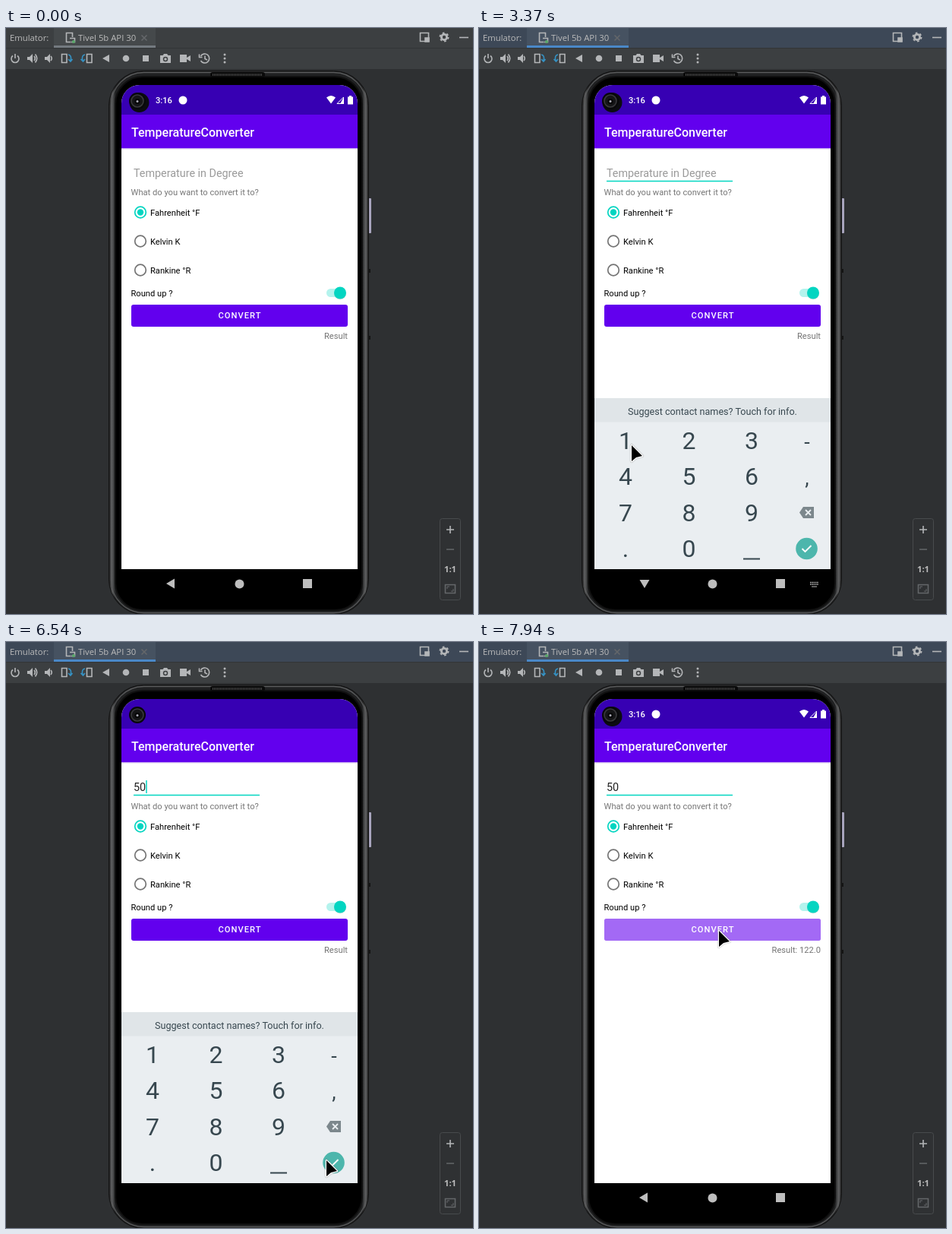
An HTML page that plays this animation: 615 by 771 pixels, repeating every 8000 ms.

```html
<!DOCTYPE html>
<html lang="en">
<head>
<meta charset="utf-8">
<title>Temperature converter in an emulator</title>
<style>
  html, body { margin: 0; width: 100%; height: 100%; overflow: hidden; background: #2e3032; }
  svg { display: block; width: 615px; height: 771px; }
  text { font-family: Roboto, sans-serif; font-size: 11.15px; }
  .ide { font-family: "Open Sans", sans-serif; font-size: 11.3px; fill: #bbb; }
  .line { fill: none; stroke: #b4b6b8; stroke-width: 1.6; }
  .dim { stroke: #64676a; }
  .blue { stroke: #3592c4; }
  .gray { fill: #757575; }
  .medium { font-weight: 500; fill: #fff; }
  .mid { text-anchor: middle; }
  .end { text-anchor: end; }
  .key { font-size: 32px; fill: #37474f; text-anchor: middle; }
</style>
</head>
<body>
<svg viewBox="0 0 615 771">
  <defs>
    <clipPath id="screenClip"><rect x="152" y="75" width="311" height="678" rx="24"/></clipPath>
    <clipPath id="buttonClip"><rect x="165" y="364" width="285" height="29" rx="3"/></clipPath>
    <linearGradient id="rim" x2="1" y2="0">
      <stop offset="0" stop-color="#1a1a1a"/><stop offset=".012" stop-color="#5c5d5e"/>
      <stop offset=".025" stop-color="#202122"/><stop offset=".975" stop-color="#202122"/>
      <stop offset=".988" stop-color="#5c5d5e"/><stop offset="1" stop-color="#1a1a1a"/>
    </linearGradient>
  </defs>

  <!-- tool window -->
  <rect width="615" height="771" fill="#2e3032"/>
  <rect width="615" height="54" fill="#3c3f41"/>
  <rect id="header" width="615" height="26"/>
  <rect id="tab" x="63" width="134" height="26"/>
  <rect id="tabLine" x="63" y="23" width="134" height="3"/>
  <path d="M0 26.5H615" stroke="#323537"/>
  <text class="ide" x="5" y="17">Emulator:</text>
  <text class="ide" x="95" y="17">Tivel 5b API 30</text>
  <g class="line" stroke-width="1.2">
    <path d="M85 18.500H79.500V6.500H87.500V12"/><path d="M84 13.500H90.500V18.500H85.500"/>
    <path class="dim" d="M178.500 9.500l7 7m0-7l-7 7"/>
    <path d="M545.500 6.500H556.500V17.500H545.500z"/><path d="M552 13H557V18H552z" fill="#b4b6b8"/>
    <path d="M597 12.500H609"/>
    <circle cx="577" cy="12" r="3.600" stroke-width="2.800"/>
    <circle cx="577" cy="12" r="5.500" stroke-width="2" stroke-dasharray="2.600 3.160"/>
  </g>
  <circle cx="89" cy="18" r="2" fill="#59a869"/>

  <!-- toolbar -->
  <g class="line">
    <path d="M9 36.500a5 5 0 1 0 6 0M12 34V40"/>
    <path d="M37 37q2.500 3 0 6M38.500 34.500q4.500 5.500 0 11M59 37q2.500 3 0 6"/>
    <path d="M73.500 34.500H80V45.500H73.500zM106.500 34.500H113V45.500H106.500z"/>
    <path class="blue" d="M82 35q5 1 3 8m-3-2l3 3 2.500-3M104 35q-5 1-3 8m-2.500-2l3 3 2.500-3"/>
    <path d="M256.500 37a6 6 0 1 1 0 6M254.500 34.500v4h4M262 36.500V40.500l3 1.500"/>
  </g>
  <g fill="#b4b6b8">
    <path d="M28 38h3l4-4v12l-4-4h-3zM51 38h3l4-4v12l-4-4h-3z"/>
    <path d="M127 40l9-5v10z"/><circle cx="158" cy="40" r="4.300"/><path d="M180 36h8v8h-8z"/>
    <path d="M203 36h3.500l1.500-2h4l1.500 2h3.500v10h-14z"/>
    <path d="M229 35h9v10h-9zM238 39l5-3v8l-5-3z"/>
    <circle cx="288" cy="35" r="1.500"/><circle cx="288" cy="40" r="1.500"/><circle cx="288" cy="45" r="1.500"/>
  </g>
  <circle cx="210" cy="41" r="2.500" fill="#b4b6b8" stroke="#3c3f41" stroke-width="1.400"/>

  <!-- zoom panel -->
  <rect x="571.500" y="645.500" width="27" height="107" rx="3" fill="#2f3133" stroke="#484b4d"/>
  <g class="line">
    <path d="M580 660H590M585 655V665"/>
    <path class="dim" d="M580 686H590M578.500 732.500H591.500V743.500H578.500z"/>
    <path class="dim" stroke-width="1" d="M581 738V735H584M589 738V741H586"/>
  </g>
  <text class="ide mid" x="585" y="716" font-weight="700">1:1</text>

  <!-- handset -->
  <rect x="477.500" y="224" width="3.500" height="46" rx="1" fill="#a8a4bd"/>
  <path d="M479 317v5M479 405v5" stroke="#151515" stroke-width="2"/>
  <rect x="135.500" y="56.500" width="342" height="715" rx="46" fill="url(#rim)" stroke="#121212"/>
  <rect x="138.500" y="58.500" width="336" height="711" rx="43" fill="none" stroke="#58595a" stroke-width="1.300"/>
  <rect x="144" y="64" width="325" height="702" rx="36" fill="#000" stroke="#101010" stroke-width="2"/>
  <rect x="269" y="58" width="72" height="7" rx="3" fill="#0a0a0a"/>
  <path d="M272 61.500H338" stroke="#4a4a4a" stroke-width="3" stroke-dasharray="1 1"/>

  <!-- app -->
  <g clip-path="url(#screenClip)">
    <rect x="152" y="75" width="311" height="637" fill="#fff"/>
    <rect x="152" y="75" width="311" height="39" fill="#3700b3"/>
    <rect x="152" y="114" width="311" height="44.500" fill="#6200ee"/>
    <path d="M152 159H463" stroke="#d9cdec"/>
    <g id="status">
      <circle cx="175.500" cy="98" r="13" fill="#0c0c10"/>
      <text class="medium" x="197" y="99">3:16</text>
      <g fill="#fff">
        <circle cx="233" cy="95" r="5.500"/>
        <path d="M422 91.500q6-5 12 0l-6 8zM450 90.500h2v-1.500h3v1.500h2v10h-7z"/>
        <path d="M440 100h5v-9.500z"/>
      </g>
      <path d="M436 99.500L444.500 91V99.500z" fill="none" stroke="#fff"/>
    </g>
    <circle cx="173" cy="96" r="11" fill="#08080a"/>
    <circle cx="173" cy="96" r="8" fill="#151517" stroke="#39393c" stroke-width="1.600"/>
    <circle cx="173" cy="96.500" r="3.500" fill="#050506"/>
    <circle cx="173" cy="96.500" r="1.500" fill="#a9a9b5"/>

    <text class="medium" x="165" y="143" style="font-size:16px">TemperatureConverter</text>
    <text id="field" x="168" y="195.500" style="font-size:14.350px"></text>
    <path id="hoverLine" d="M243 201.500H334" stroke="#ddd"/>
    <path id="focusLine" d="M168 201.500H334" stroke="#03d5c1" stroke-width="1.600"/>
    <rect id="caret" y="182" width="1.500" height="17" fill="#03d5c1"/>
    <text class="gray" x="164.500" y="220">What do you want to convert it to?</text>
    <g fill="none" stroke="#757575" stroke-width="1.700">
      <circle cx="177" cy="242.500" r="7.300" stroke="#03d5c1"/>
      <circle cx="177" cy="280.500" r="7.300"/>
      <circle cx="177" cy="318.500" r="7.300"/>
    </g>
    <circle cx="177" cy="242.500" r="4.200" fill="#03d5c1"/>
    <text x="190" y="246.500">Fahrenheit °F</text>
    <text x="190" y="284.500">Kelvin K</text>
    <text x="190" y="322.500">Rankine °R</text>
    <text x="164.500" y="353">Round up ?</text>
    <rect x="422" y="343" width="25" height="11" rx="5.500" fill="#b4f3ed"/>
    <circle cx="440" cy="349.300" r="8" fill="#000" opacity=".13"/>
    <circle cx="440" cy="348.500" r="8" fill="#03d5c1"/>
    <g clip-path="url(#buttonClip)">
      <rect x="165" y="364" width="285" height="29" fill="#6200ee"/>
      <circle id="ripple" cx="316" cy="379" fill="#fff" opacity=".41"/>
    </g>
    <text class="medium mid" x="308" y="382" letter-spacing="1">CONVERT</text>
    <text id="result" class="gray end" x="450" y="409"></text>

    <g id="nav" fill="#bebebe">
      <path id="back" d="M211 731l11-6.500v13z"/>
      <circle cx="307.500" cy="731.500" r="6"/>
      <path d="M391 725h12v12h-12z"/>
      <g id="hideKeys">
        <path d="M211.500 726h13l-6.500 11z"/>
        <path d="M436 729.500H447M436 732H447" stroke="#bebebe" stroke-width="1.500" stroke-dasharray="1.500 .8"/>
        <path d="M438 735H445" stroke="#bebebe"/>
      </g>
    </g>

    <g id="keyboard">
      <rect x="152" y="487" width="311" height="225" fill="#eaeef1"/>
      <rect x="152" y="487" width="311" height="31.500" fill="#e0e5e8"/>
      <rect id="pressed" x="237" width="78" height="36" fill="#cfd4d7"/>
      <text class="mid" x="307.500" y="508.500" style="font-size:12.600px" fill="#37474f">Suggest contact names? Touch for info.</text>
      <g id="keys"></g>
      <path d="M348 698.500H370" stroke="#37474f" stroke-width="1.800"/>
      <path d="M422 637.500l5-7.500h14v15h-14z" fill="#7c878c"/>
      <path d="M430 634l7 7m0-7l-7 7" stroke="#eaeef1" stroke-width="1.800"/>
      <circle cx="431.500" cy="685" r="14.300" fill="#4db6ac"/>
      <path d="M425.500 685l4 4 8-8" fill="none" stroke="#fff" stroke-width="1.900"/>
    </g>
  </g>

  <g id="cursor" stroke-linejoin="round">
    <path d="M0 0V21L6 16 14 14z" fill="#000" stroke="#777" stroke-width="4.500" opacity=".22"/>
    <path d="M0 0V21L6 16 14 14z" stroke="#fff" stroke-width="2.400" paint-order="stroke"/>
  </g>
</svg>
<script>
const $ = id => document.getElementById(id);
const set = (id, attrs) => { for (const name in attrs) $(id).setAttribute(name, attrs[name]); };
const show = (id, on) => { $(id).style.display = on ? '' : 'none'; };
const progress = (t, from, to) => Math.min(1, Math.max(0, (t - from) / (to - from)));
const smooth = p => p * p * (3 - 2 * p);

const LOOP = 8000, FOCUS = 1650, KEYS_IN = 1780, BARS_OFF = 6200, KEYS_OUT = 6600, BARS_ON = 6960;
const TYPE_5 = 4790, TYPE_0 = 5260, CONVERT = 7700;

// time, x, y of the pointer tip
const path = [
  [300, 540, 330], [780, 328, 198], [1130, 328, 198], [1410, 227, 188], [1830, 227, 188],
  [2140, 298, 407], [2260, 309, 430], [2440, 309, 430], [2850, 238, 572], [3190, 207, 549],
  [3370, 201, 549], [4310, 201, 549], [4600, 274, 591], [4830, 274, 591], [5030, 270, 685],
  [5420, 270, 685], [5760, 385, 689], [5940, 385, 689], [6200, 422, 682], [6600, 422, 682],
  [6840, 325, 438], [7050, 316, 397], [7230, 316, 397], [7440, 316, 380], [LOOP, 316, 380]
];

function pointer(t) {
  const i = path.findIndex(([time]) => time > t);
  const [t0, x0, y0] = path[i - 1], [t1, x1, y1] = path[i];
  const p = smooth(progress(t, t0, t1));
  return [x0 + (x1 - x0) * p, y0 + (y1 - y0) * p];
}

const rows = ['123-', '456,', '789', '.0'];
$('keys').innerHTML = rows.map((row, r) => [...row].map((key, c) =>
  `<text class="key" x="${[193, 276.5, 359, 432][c]}" y="${554 + r * 47.4}"${c > 2 ? ' style="font-size:27px"' : ''}>${key}</text>`
).join('')).join('');

function draw(t) {
  const focused = t >= FOCUS;
  set('header', { fill: focused ? '#3d4857' : '#3c3f41' });
  set('tab', { fill: focused ? '#465261' : '#45494b' });
  set('tabLine', { fill: focused ? '#4a88c7' : '#747a80' });
  show('focusLine', focused);
  show('hoverLine', !focused && t >= 1200);

  const typed = t < TYPE_5 ? '' : t < TYPE_0 ? '5' : '50';
  $('field').textContent = typed || 'Temperature in Degree';
  set('field', { fill: typed ? '#212121' : '#9a9a9a' });
  const blinkStart = t < TYPE_5 ? 1550 : t < TYPE_0 ? TYPE_5 : TYPE_0;
  show('caret', focused && Math.floor((t - blinkStart) / 500) % 2 === 0);
  set('caret', { x: 168 + typed.length * 8.1 });

  const barsShown = t < BARS_OFF || t >= BARS_ON;
  const keysUp = t >= KEYS_IN && t < BARS_ON;
  show('status', barsShown);
  show('nav', barsShown);
  show('back', !keysUp);
  show('hideKeys', keysUp);

  const hidden = t < 4000 ? 1 - progress(t, KEYS_IN, KEYS_IN + 260) : progress(t, KEYS_OUT, KEYS_OUT + 260);
  set('keyboard', { transform: `translate(0 ${213 * hidden})`, opacity: 1 - hidden });
  const press5 = t >= 4620 && t < 4830, press0 = t >= 5200 && t < 5420;
  show('pressed', press5 || press0);
  set('pressed', { y: press5 ? 572 : 667 });

  set('ripple', { r: 160 * smooth(progress(t, CONVERT, CONVERT + 220)) });
  $('result').textContent = t < CONVERT + 160 ? 'Result' : 'Result: 122.0';

  show('cursor', t >= 300);
  if (t >= 300) set('cursor', { transform: `translate(${pointer(t)})` });
}

function tick() {
  draw(performance.now() % LOOP);
  requestAnimationFrame(tick);
}
tick();
</script>
</body>
</html>
```
